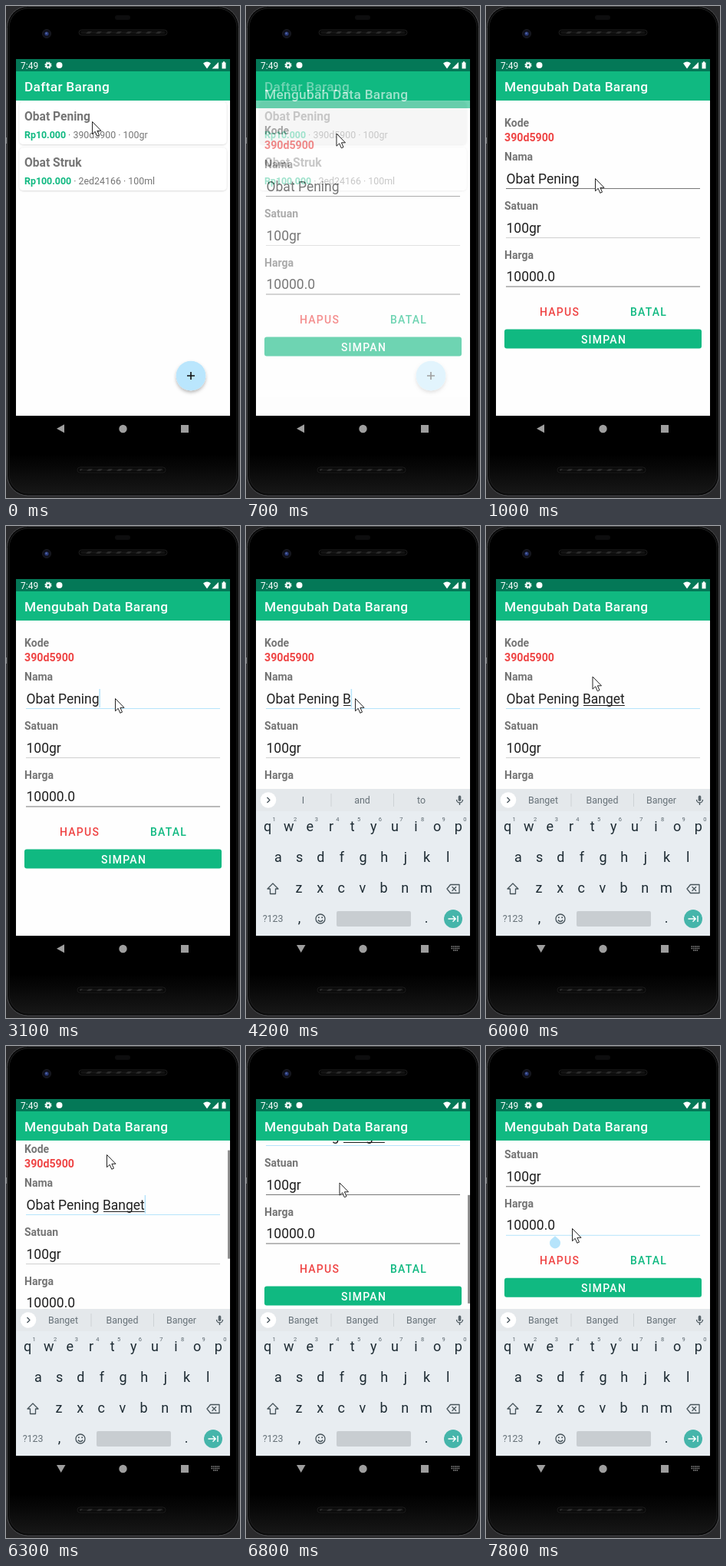
Recreate the animation shown at these times as an HTML page. Size 305 px wide and 640 px high, loop 8 s.

```html
<!DOCTYPE html>
<html lang="id">
<head>
<meta charset="utf-8">
<title>Daftar Barang</title>
<style>
html, body { margin: 0; width: 100%; height: 100%; overflow: hidden; background: #2b2b2d; }
svg { display: block; width: 100%; height: 100%; font-family: Roboto, sans-serif; }
text { white-space: pre; }
.title { font-size: 17.3px; font-weight: 500; letter-spacing: .3px; fill: #fff; }
.name { font-size: 15.6px; font-weight: 700; fill: #757575; }
.info { font-size: 12.4px; fill: #757575; }
.price { font-weight: 700; fill: #10b981; }
.label { font-size: 14px; font-weight: 700; fill: #757575; }
.code { font-size: 14.2px; fill: #ef4444; }
.input { font-size: 17.5px; fill: #212121; }
.button { font-size: 14px; font-weight: 500; letter-spacing: 1.25px; text-anchor: middle; }
.key { font-size: 18px; fill: #1d2b33; text-anchor: middle; }
.digit { font-size: 7.5px; fill: #59656c; text-anchor: middle; }
.word { font-size: 12.4px; fill: #667178; text-anchor: middle; }
.icon { fill: none; stroke: #46535a; stroke-width: 1.3; stroke-linejoin: round; }
</style>
</head>
<body>
<svg id="stage" viewBox="0 0 305 640" xmlns="http://www.w3.org/2000/svg"></svg>
<script>
const LOOP = 8000;
const GREEN = '#10b981', BLUE = '#b6e4fb';

const text = (x, y, cls, str, extra = '') => `<text x="${x}" y="${y}" class="${cls}" ${extra}>${str}</text>`;
const rect = (x, y, w, h, fill, extra = '') =>
  `<rect x="${x}" y="${y}" width="${w}" height="${h}" fill="${fill}" ${extra}/>`;
const circle = (x, y, r, fill, extra = '') => `<circle cx="${x}" cy="${y}" r="${r}" fill="${fill}" ${extra}/>`;
const path = (d, extra = '') => `<path d="${d}" ${extra}/>`;

const speaker = (x, y) =>
  rect(x, y, 115, 7, '#080808', 'rx="3.5" stroke="#1c1c1c"') +
  rect(x + 3, y + 2, 109, 3, 'url(#mesh)', 'rx="1.5"');

const phone = () =>
  rect(0, 0, 305, 640, '#2b2b2d') +
  rect(0, 171, 2, 8, '#77797c') +
  rect(1.5, .5, 302, 636.5, '#0a0a0a', 'rx="27" stroke="#4c4d50"') +
  rect(4, 3, 297, 631, 'url(#body-shade)', 'rx="25" stroke="#1d1e1f"') +
  rect(142, 12, 20, 6, '#0d0d0e', 'rx="3"') +
  circle(53, 36, 5.5, '#10111a', 'stroke="#1c1d24"') + circle(53, 36, 2.6, '#293a78') +
  circle(52.5, 35.5, 1, '#6878b8') +
  speaker(95, 31) + speaker(93, 600);

const statusBar = () =>
  rect(13, 69, 279, 16, '#047857') +
  text(19, 81.5, '', '7:49', 'font-size="12" fill="#fff"') +
  circle(55, 77, 2.6, 'none', 'stroke="#fff" stroke-width="2"') +
  circle(55, 77, 4, 'none', 'stroke="#fff" stroke-width="1.2" stroke-dasharray="1.8 1.34"') +
  circle(69.5, 77, 4, '#fff') +
  path('M257 74.5Q262 70.5 267 74.5L262 81.5Z', 'fill="#fff"') +
  path('M277 73V81.5H268.5Z', 'fill="#fff"') +
  path('M281.5 73.5H283V72.3H285V73.5H286.5V81.5H281.5Z', 'fill="#fff"');

const page = (title, content) =>
  rect(13, 85, 279, 448, '#fefefe') +
  `<g clip-path="url(#body)">${content}</g>` +
  rect(13, 85, 279, 38, GREEN) + text(24, 110.5, 'title', title);

const card = (y, name, price, info, id) =>
  rect(17.5, y, 270, 55.5, '#fff', `id="${id}" rx="5" filter="url(#soft)"`) +
  text(24, y + 24.5, 'name', name) +
  text(24, y + 47, 'info', `<tspan class="price">${price}</tspan> · ${info}`);

const listPage = () => page('Daftar Barang',
  card(124.5, 'Obat Pening', 'Rp10.000', '390d5900 · 100gr', 'firstCard') +
  card(184.5, 'Obat Struk', 'Rp100.000', '2ed24166 · 100ml', 'secondCard') +
  circle(241, 481, 19.3, '#bae6fd', 'filter="url(#lift)"') +
  path('M236 481H246M241 476V486', 'stroke="#111" stroke-width="1.6"'));

const field = (y, label, value, id) =>
  text(24, y, 'label', label) +
  text(26.5, y + 29.5, 'input', value, `id="${id}"`) +
  rect(26, y + 36, 253, 1, '#777', `id="${id}Line"`);

const formPage = () => page('Mengubah Data Barang',
  '<g id="form">' +
  text(24, 156.5, 'label', 'Kode') + text(24, 175.5, 'label code', '390d5900') +
  field(201, 'Nama', 'Obat Pening', 'nama') +
  field(265, 'Satuan', '100gr', 'satuan') +
  field(328.5, 'Harga', '10000.0', 'harga') +
  rect(127, 233, 10, 1, '#212121', 'id="composing"') +
  rect(0, 0, 1.5, 24, BLUE, 'id="caret"') +
  path('M90 366L95 370.2A7 7 0 1 1 85 370.2Z', `id="handle" fill="${BLUE}"`) +
  text(96, 403.2, 'button', 'HAPUS', 'fill="#ef4444"') +
  text(212, 403.2, 'button', 'BATAL', `fill="${GREEN}"`) +
  rect(24, 420.5, 257, 25, GREEN, 'rx="3"') +
  text(153.5, 438.5, 'button', 'SIMPAN', 'fill="#fff"') + '</g>' +
  rect(289, 124, 3, 141, '#8f8f8f', 'id="scrollbar"'));

const keyRow = (letters, x, y) => [...letters].map((c, i) => text(x + i * 27.65, y, 'key', c)).join('');

const keyboard = () =>
  rect(13, 342, 279, 191, '#e8edf1') + rect(13, 342, 279, 29, '#e4e8eb') +
  circle(29, 356.5, 10.3, '#fff') + path('M27.5 353L31 356.5L27.5 360', 'class="icon"') +
  [74.5, 151.5, 228.5].map((x, i) => text(x, 361, 'word', '', `id="word${i}"`)).join('') +
  rect(110.5, 348, 1, 17, '#cdd2d5') + rect(192, 348, 1, 17, '#cdd2d5') +
  rect(276.7, 350.5, 3.6, 7.5, '#59656c', 'rx="1.8"') +
  path('M274.5 356A4 4 0 0 0 282.5 356M278.5 360V363', 'class="icon"') +
  keyRow('qwertyuiop', 28, 397) + keyRow('asdfghjkl', 42, 437) + keyRow('zxcvbnm', 69, 477) +
  [...'1234567890'].map((c, i) => text(36.5 + i * 27.65, 384, 'digit', c)).join('') +
  path('M35 465L42 472H38.5V478.5H31.5V472H28Z', 'class="icon"') +
  path('M262 472L266.5 466.5H278V477.5H266.5ZM268.5 469.3L274 474.7M274 469.3L268.5 474.7', 'class="icon"') +
  text(35, 515, 'word', '?123') + text(69.5, 516, 'key', ',') + text(235, 516, 'key', '.') +
  circle(97, 511, 6, 'none', 'class="icon"') +
  circle(94.8, 509.2, 1, '#46535a') + circle(99.2, 509.2, 1, '#46535a') +
  path('M93.8 512.5Q97 516.5 100.2 512.5', 'class="icon"') +
  rect(118, 501, 97, 20, '#c8cdd1', 'rx="2"') +
  circle(270, 511, 12, '#45b5aa') +
  path('M263.5 511H273M269.5 507.3L273.2 511L269.5 514.7M276 507V515', 'fill="none" stroke="#fff" stroke-width="1.4"');

const navBar = () =>
  path('', 'id="back" fill="#9e9e9e"') +
  circle(152.5, 550, 5.2, '#9e9e9e') + rect(228, 545, 10, 10, '#9e9e9e') +
  path('M267.5 547H279M267.5 549.5H279M270 552H276.5',
    'id="imeIcon" stroke="#8a8a8a" stroke-width="1.4" stroke-dasharray="1.5 .8"');

const stage = document.getElementById('stage');
stage.innerHTML = `<defs>
  <clipPath id="body"><rect x="13" y="123" width="279" height="410"/></clipPath>
  <clipPath id="screen"><rect x="13" y="85" width="279" height="448"/></clipPath>
  <linearGradient id="body-shade" x2="0" y2="1">
    <stop offset=".92"/><stop offset="1" stop-color="#171717"/></linearGradient>
  <pattern id="mesh" width="13" height="6" patternUnits="userSpaceOnUse">
    <rect width="13" height="6" fill="#131313"/><path d="M0 6L6 0H11L5 6Z" fill="#2a2a2a"/></pattern>
  <filter id="soft"><feDropShadow dx="0" dy=".5" stdDeviation=".8" flood-opacity=".2"/></filter>
  <filter id="lift" x="-30%" y="-30%" width="160%" height="170%">
    <feDropShadow dx="0" dy="2.5" stdDeviation="2" flood-opacity=".28"/></filter>
  </defs>` + phone() + statusBar() +
  `<g clip-path="url(#screen)"><g id="list">${listPage()}</g><g id="edit">${formPage()}</g></g>` +
  `<g id="keyboard">${keyboard()}</g>` + navBar() +
  path('M0 0V16.2L3.7 12.8L6.3 18.8L9 17.6L6.4 11.8H11.5Z', 'id="pointer" fill="#fff" stroke="#222" stroke-width="1"');

const el = {};
stage.querySelectorAll('[id]').forEach(node => el[node.id] = node);
const set = (id, attrs) => { for (const k in attrs) el[id].setAttribute(k, attrs[k]); };
const show = (id, on) => set(id, { visibility: on ? 'visible' : 'hidden' });

// Each step changes only the listed parts of the state.
const steps = [
  [0, { x: 112.5, y: 150.5, pressed: false, fade: 0, rise: 0, focus: '', caret: false, typed: '',
        keys: false, words: 'I and to', scroll: 0, bar: 0, handle: false }],
  [200, { pressed: true }],
  [700, { fade: .6, rise: 10, x: 118, y: 166 }],
  [800, { fade: .92, rise: 3, x: 128, y: 190 }],
  [900, { fade: 1, rise: 0, x: 138, y: 214 }],
  [1000, { x: 142.5, y: 224.5 }],
  [3100, { focus: 'nama', caret: true }],
  [4200, { keys: true, typed: 'B' }],
  [4600, { typed: 'Ba' }],
  [4800, { typed: 'Ban', words: 'Ba Back Baby' }],
  [5000, { typed: 'Bang' }],
  [5200, { typed: 'Bange' }],
  [5300, { typed: 'Banget' }],
  [5500, { words: 'Banget Banged Banger' }],
  [5700, { caret: false }],
  [6000, { x: 139, y: 196 }],
  [6100, { x: 134, y: 170 }],
  [6200, { x: 132, y: 153, caret: true, scroll: 6, bar: 1 }],
  [6300, { x: 131.5, y: 141.5, scroll: 18 }],
  [6500, { x: 130, y: 128, scroll: 45 }],
  [6700, { x: 128, y: 140, scroll: 85, caret: false }],
  [6800, { x: 122, y: 178, scroll: 108 }],
  [6900, { x: 115, y: 220, scroll: 118.7 }],
  [7000, { x: 112.5, y: 237.5, focus: 'harga', caret: true }],
  [7500, { caret: false, bar: .5 }],
  [7600, { bar: 0 }],
  [7800, { handle: true }]
];
const stateAt = t => Object.assign({}, ...steps.filter(([at]) => at <= t).map(([, change]) => change));

function render(t) {
  const s = stateAt(t);
  set('firstCard', { fill: s.pressed ? '#ececec' : '#fff' });
  set('edit', { opacity: s.fade, transform: `translate(0 ${s.rise})` });
  set('form', { transform: `translate(0 ${-s.scroll})` });
  set('scrollbar', { opacity: s.bar, y: 124 + s.scroll * 218 / 337 });

  el.nama.textContent = 'Obat Pening' + (s.typed && ' ' + s.typed);
  const end = 26.5 + el.nama.getComputedTextLength();
  set('composing', { width: s.typed ? Math.max(0, end - 127) : 0 });
  set('namaLine', { fill: s.focus === 'nama' ? BLUE : '#777' });
  set('satuanLine', { fill: s.scroll > 100 ? '#777' : '#d0d0d0' });
  set('hargaLine', { fill: s.focus === 'harga' ? BLUE : '#777' });

  const onPrice = s.focus === 'harga';
  set('caret', { x: onPrice ? 90 : end - .2, y: onPrice ? 339.5 : 212, opacity: s.caret ? 1 : 0 });
  set('handle', { opacity: s.handle ? 1 : 0 });

  show('keyboard', s.keys);
  show('imeIcon', s.keys);
  set('back', { d: s.keys ? 'M66 545H77.5L71.7 555Z' : 'M76 544.3V555.3L66 549.8Z' });
  s.words.split(' ').forEach((word, i) => el['word' + i].textContent = word);
  set('pointer', { transform: `translate(${s.x} ${s.y})` });
}

const start = performance.now();
function tick() {
  render((performance.now() - start) % LOOP);
  requestAnimationFrame(tick);
}
tick();
</script>
</body>
</html>
```
